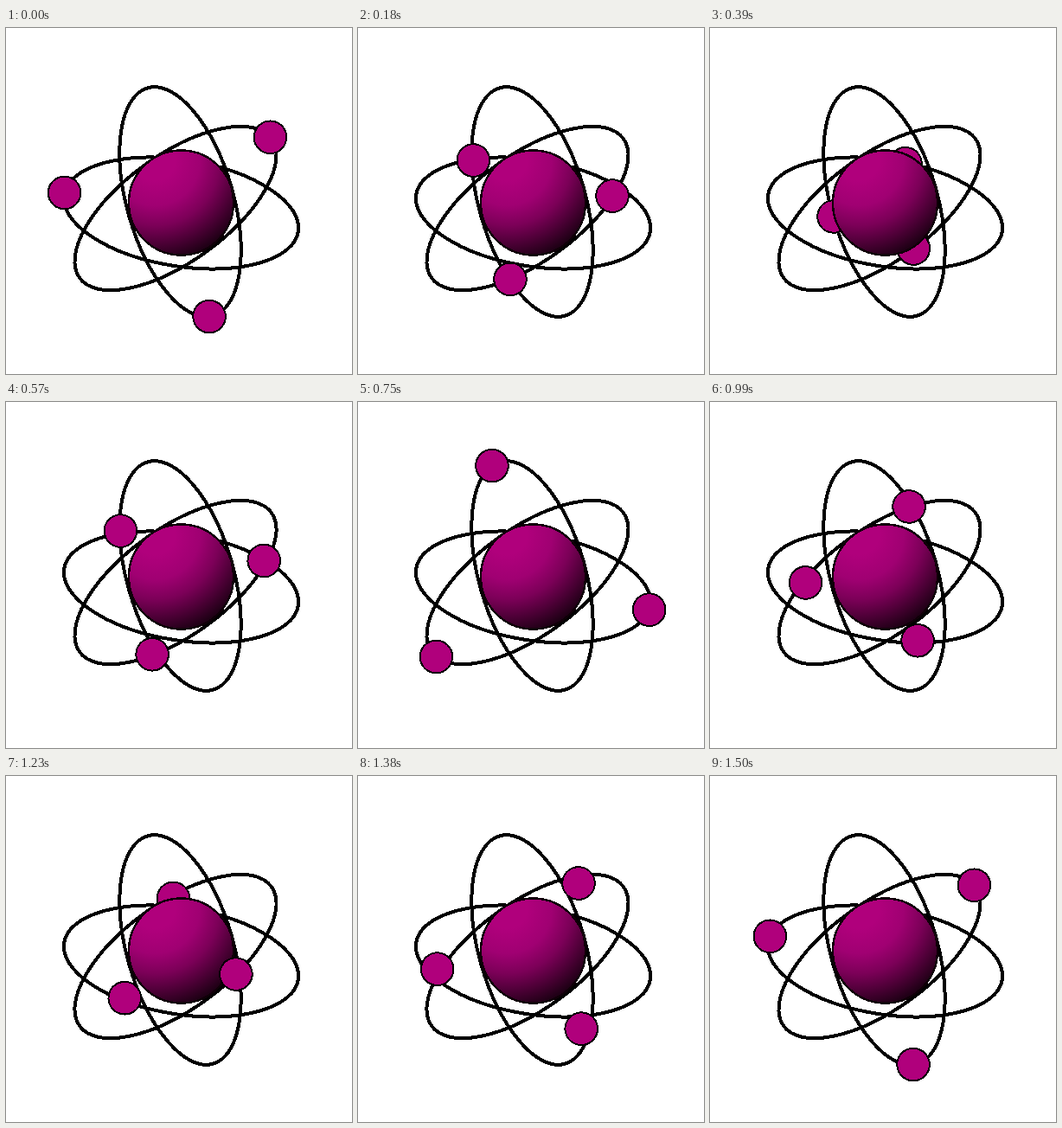
An HTML page that plays this animation: 400x400 px, repeating every 1.53 s.

```html
<!DOCTYPE html>
<html lang="en">
<head>
<meta charset="utf-8">
<title>Atom</title>
<style>
  html, body { margin: 0; width: 100%; height: 100%; overflow: hidden; background: #fff; }
  svg { display: block; width: 100vw; height: 100vh; shape-rendering: crispEdges; }
  .orbit { fill: none; stroke: #000; stroke-width: 4; }
  .electron { fill: #b0007c; stroke: #000; stroke-width: 2; }
  .nucleus { fill: url(#shade); stroke: #100008; stroke-width: 2.5; }
</style>
</head>
<body>
<svg viewBox="0 0 400 400">
  <defs>
    <radialGradient id="shade" cx=".25" cy=".1" r=".95">
      <stop offset=".2" stop-color="#b0007c"/>
      <stop offset=".45" stop-color="#a00072"/>
      <stop offset=".65" stop-color="#7c0058"/>
      <stop offset="1" stop-color="#200016"/>
    </radialGradient>
  </defs>
  <g id="orbits"></g>
  <g id="back"></g>
  <circle class="nucleus" cx="202.5" cy="202" r="60.5"/>
  <g id="front"></g>
</svg>
<script>
  const LOOP = 1530, STEP = 30, TURN = 1500, CHORDS = 8;
  const RX = 137, RY = 61.5, RAD = Math.PI / 180;

  // Angles in degrees: tilt of the orbit, first phase, sweep per turn, lag at half turn
  const orbits = [
    { x: 202.5, y: 214, tilt: 9, start: 182, sweep: 365, lag: 0, crosses: true },
    { x: 201.5, y: 201, tilt: 74, start: 4, sweep: 360, lag: 13, crosses: true },
    { x: 196, y: 208.5, tilt: -36, start: -2, sweep: 360, lag: 5, crosses: false }
  ];

  const layer = id => document.getElementById(id);

  function add(parent, name, attrs) {
    const el = document.createElementNS('http://www.w3.org/2000/svg', name);
    for (const key in attrs) el.setAttribute(key, attrs[key]);
    parent.append(el);
    return el;
  }

  for (const o of orbits) {
    o.transform = `translate(${o.x} ${o.y}) rotate(${o.tilt})`;
    add(layer('orbits'), 'ellipse', { class: 'orbit', rx: RX, ry: RY, transform: o.transform });
    o.dot = add(layer('back'), 'circle', { class: 'electron', r: 18.8, transform: o.transform });
  }

  // Nearly even speed along the ellipse: the phase runs faster at its narrow ends
  function corner(o, k) {
    const turn = k / CHORDS, a = turn * 2 * Math.PI;
    const phase = o.start + o.sweep * turn + 9 * Math.sin(2 * a) - o.lag * (1 - Math.cos(a)) / 2;
    return [RX * Math.cos(phase * RAD), RY * Math.sin(phase * RAD)];
  }

  // Electrons cut across the orbit in straight chords
  function place(o, t) {
    const s = t / TURN * CHORDS, k = Math.min(Math.floor(s), CHORDS - 1);
    const p = corner(o, k), q = corner(o, k + 1);
    const [x, y] = p.map((v, i) => v + (q[i] - v) * (s - k));
    o.dot.setAttribute('cx', x);
    o.dot.setAttribute('cy', y);
    const home = layer(o.crosses && t >= TURN / 2 ? 'front' : 'back');
    if (o.dot.parentNode !== home) home.append(o.dot);
  }

  function draw() {
    const t = Math.floor(performance.now() % LOOP / STEP) * STEP;
    orbits.forEach(o => place(o, t));
    requestAnimationFrame(draw);
  }
  draw();
</script>
</body>
</html>
```
